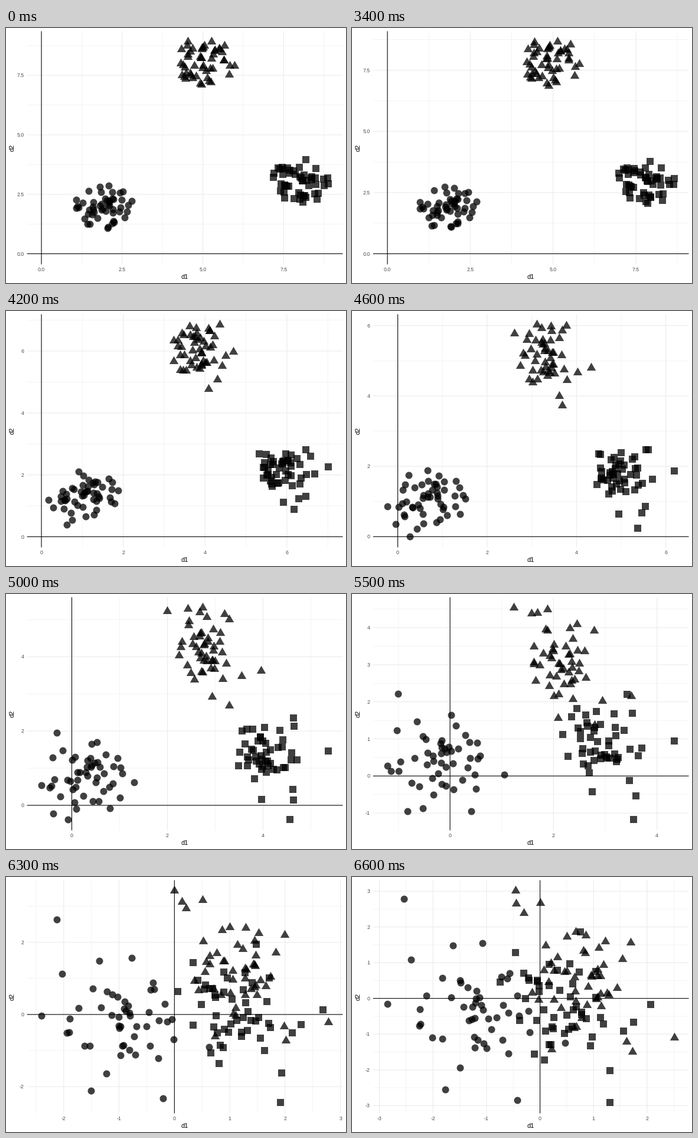
Recreate the animation shown at these times as a matplotlib script. Size 576x432 px, loop 10 s.

```python
import math

import matplotlib.pyplot as plt
import numpy as np
from matplotlib.animation import FuncAnimation

W, H, FRAMES, HOLD, MOVE = 576, 432, 100, 33, 33
LEFT, RIGHT, TOP, BOTTOM = 35.7, 570.5, 5.5, 400.4
GRID, TEXT = "#ebebeb", "#4d4d4d"
RADIUS = 5.75

plt.rcParams["font.family"] = "Liberation Sans"
rng = np.random.default_rng(11)


def disc(n, center, radii, power):
    """Random points in an ellipse; a larger power crowds the middle."""
    angle = rng.uniform(0, 2 * math.pi, n)
    r = rng.uniform(0, 1, n) ** power
    unit = np.column_stack([r * np.cos(angle), r * np.sin(angle)])
    return np.array(center) + unit * radii


def cluster(outer, start, start_radius, end, end_radii, size=50):
    """Outlying points (start x, y, end x, y) plus a random core."""
    outer = np.array(outer)
    n = size - len(outer)
    core = np.hstack([disc(n, start, start_radius, 0.5),
                      disc(n, end, end_radii, 0.7)])
    return np.vstack([outer, core])


circles = cluster([
    (2.05, 1.07, -2.54, 2.78), (2.07, 1.13, -2.85, -0.15),
    (1.07, 2.26, -1.77, -2.55), (2.09, 2.86, -0.43, -2.85),
    (2.25, 1.32, -2.01, -1.09), (1.08, 1.92, -2.25, -0.76),
    (1.74, 1.50, -2.41, 1.09), (1.33, 1.47, -1.63, 1.48),
    (2.21, 1.87, -1.07, 1.54), (2.19, 2.59, 0.47, -1.25),
    (1.42, 1.25, -1.49, -1.93), (2.69, 2.05, -0.59, -1.54),
    (2.80, 2.22, -0.59, -0.41),
], (1.95, 2.0), 0.88, (-1.2, -0.35), (1.15, 1.4))

triangles = cluster([
    (5.50, 8.63, 2.51, -1.09), (4.96, 7.12, 1.72, -1.50),
    (5.82, 7.53, 0.22, -1.42), (4.61, 7.58, -0.46, 3.01),
    (5.98, 7.91, -0.45, 2.65), (5.65, 8.13, 0.00, 2.67),
    (5.32, 8.38, -0.30, 2.39), (4.98, 8.66, 1.69, 1.56),
    (5.67, 8.75, 0.85, 1.77), (5.59, 8.48, 1.62, -1.21),
    (4.54, 8.91, 1.25, 0.15), (5.26, 8.91, 1.07, 0.62),
], (5.0, 8.0), 0.9, (0.7, 0.5), (0.95, 1.4))

squares = cluster([
    (8.87, 3.18, 2.07, -0.17), (8.89, 2.93, 0.78, -0.38),
    (8.01, 2.30, 1.31, -2.92), (8.16, 2.44, 1.31, -2.02),
    (8.76, 2.87, 0.75, 1.86), (8.10, 2.17, 0.08, -1.72),
    (8.19, 3.95, -0.10, -1.56), (8.29, 2.87, -0.46, 1.29),
    (8.02, 2.46, -0.74, 0.45), (7.63, 3.62, 1.75, -0.67),
    (7.81, 3.48, 1.56, -0.91), (8.53, 2.29, 0.94, -1.32),
], (7.98, 3.05), 0.87, (0.42, -0.1), (1.0, 1.25))

TRIANGLE = [(-1.3416, -0.7756), (1.3416, -0.7756), (0, 1.5512)]
GROUPS = [(circles, "o", 2 * RADIUS + 0.5),
          (triangles, TRIANGLE, 2 * 1.5512 * RADIUS),
          (squares, "s", 2 * RADIUS)]


def nice_step(lo, hi, want=5):
    """Tick step by simplicity, coverage and density of the labels."""
    best, best_step = -9, 1
    span = hi - lo
    for rank, q in enumerate((1, 5, 2, 2.5, 4, 3)):
        for power in (-1, 0, 1):
            step = q * 10.0 ** power
            for k in range(2, 13):
                first = math.floor(hi / step) - (k - 1)
                for n in range(first, math.ceil(lo / step) + 1):
                    a, b = n * step, (n + k - 1) * step
                    has_zero = a <= 0 <= b
                    simplicity = has_zero - rank / 5
                    coverage = 1 - 0.5 * ((hi - b) ** 2 + (lo - a) ** 2) / (0.1 * span) ** 2
                    ratio = (1 / step) * (max(b, hi) - min(a, lo)) / (want - 1)
                    density = 2 - max(ratio, 1 / ratio)
                    score = 0.25 * simplicity + 0.2 * coverage + 0.5 * density
                    if score > best:
                        best, best_step = score, step
    return best_step


def multiples(step, lo, hi):
    return [n * step for n in range(math.ceil(lo / step), math.floor(hi / step) + 1)]


def view(values):
    """Range that holds the data and zero, widened by 5 % on each side."""
    lo, hi = min(0, values.min()), max(0, values.max())
    pad = 0.05 * (hi - lo)
    return lo - pad, hi + pad


fig = plt.figure(figsize=(W / 72, H / 72), dpi=72, facecolor="white")
ax = fig.add_axes([0, 0, 1, 1])


def draw(frame):
    t = min(max((frame - HOLD) / MOVE, 0), 1)
    placed = [(1 - t) * g[:, :2] + t * g[:, 2:] for g, _, _ in GROUPS]
    everything = np.vstack(placed)
    x_lo, x_hi = view(everything[:, 0])
    y_lo, y_hi = view(everything[:, 1])

    def px(x):
        return LEFT + (x - x_lo) / (x_hi - x_lo) * (RIGHT - LEFT)

    def py(y):
        return BOTTOM - (y - y_lo) / (y_hi - y_lo) * (BOTTOM - TOP)

    def rule(x=None, y=None, color=GRID, width=1.07, z=1):
        xs = (LEFT, RIGHT) if x is None else (px(x), px(x))
        ys = (TOP, BOTTOM) if y is None else (py(y), py(y))
        ax.plot(xs, ys, color=color, lw=width, zorder=z, snap=False,
                solid_capstyle="butt")

    ax.clear()
    ax.set(xlim=(0, W), ylim=(H, 0))
    ax.axis("off")

    for axis, lo, hi in (("x", x_lo, x_hi), ("y", y_lo, y_hi)):
        step = nice_step(lo, hi)
        digits = 1 if step % 1 else 0
        for v in multiples(step / 2, lo, hi):
            major = round(v / step * 2) % 2 == 0
            rule(**{axis: v}, width=1.07 if major else 0.53, z=2 if major else 1)
            if not major:
                continue
            label = f"{v:.{digits}f}"
            if axis == "x":
                ax.text(px(v), 411.8, label, size=8.8, color=TEXT, ha="center", va="baseline")
            else:
                ax.text(30.7, py(v) + 3.1, label, size=8.8, color=TEXT, ha="right", va="baseline")

    rule(x=0, color="black", z=3)
    rule(y=0, color="black", z=3)

    for points, (_, marker, size) in zip(placed, GROUPS):
        ax.scatter(px(points[:, 0]), py(points[:, 1]), s=size ** 2, marker=marker,
                   color="black", alpha=0.75, linewidths=0, zorder=4)

    ax.text((LEFT + RIGHT) / 2, 425.2, "d1", size=11, ha="center", va="baseline")
    ax.text(10, (TOP + BOTTOM) / 2, "d2", size=11, rotation=90, ha="center", va="center")
    return []


animation = FuncAnimation(fig, draw, frames=FRAMES, interval=100,
                          init_func=lambda: [], repeat=True, repeat_delay=0)
plt.show()
```
